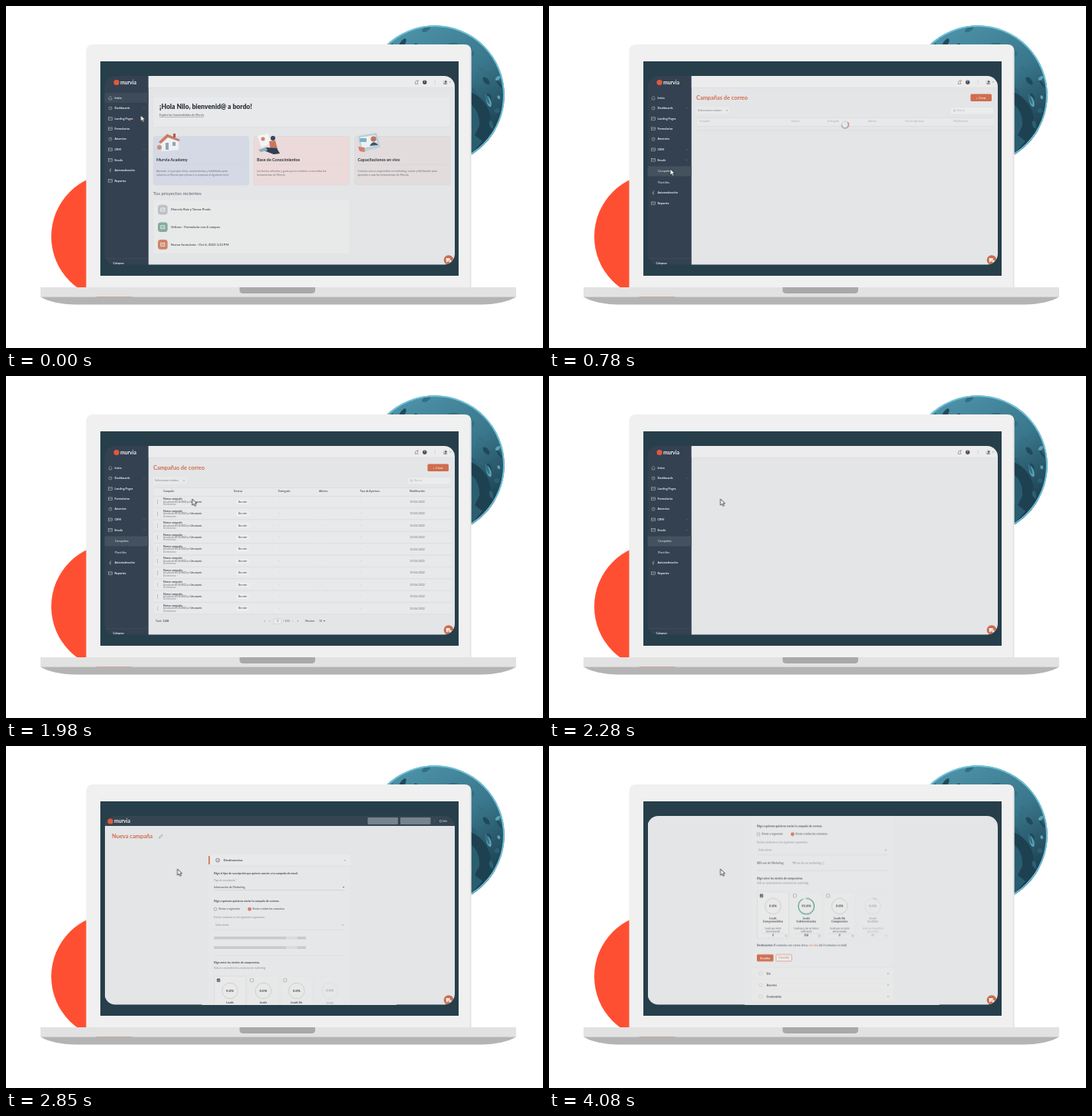
Write an HTML page that moves like this. It is 700 px wide and 445 px high and loops after 4.17 s.

```html
<!DOCTYPE html>
<html lang="es">
<head>
<meta charset="utf-8">
<title>Campañas de correo</title>
<style>
  html, body { margin: 0; width: 100%; height: 100%; overflow: hidden; background: #fff; }
  svg { display: block; width: 100vw; height: 100vh; font-family: Lato, "Open Sans", sans-serif; }
</style>
</head>
<body>
<script>
const LOOP = 4170;
const INK = '#454b52', GREY = '#8b9095', LINE = '#d3d5d7', ORANGE = '#cf6d4e', NAVY = '#344150', PAGE = '#e4e5e7';

// ---- Markup helpers; text y is the middle of the line ----
const attrs = o => Object.entries(o).map(([k, v]) => `${k}="${v}"`).join(' ');
const rect = (x, y, w, h, fill, more = {}) =>
  `<rect ${attrs({ x, y, width: w, height: h, fill, ...more })}/>`;
const circle = (cx, cy, r, fill, more = {}) => `<circle ${attrs({ cx, cy, r, fill, ...more })}/>`;
const path = (d, fill = 'none', stroke = 'none', width = 0.6, more = {}) =>
  `<path ${attrs({ d, fill, stroke, 'stroke-width': width, ...more })}/>`;
const text = (x, y, size, str, fill = INK, weight = 400, more = {}) =>
  `<text ${attrs({ x, y: y + size * 0.34, 'font-size': size, fill, 'font-weight': weight, ...more })}>${str}</text>`;
const mid = (x, y, size, str, fill, weight) => text(x, y, size, str, fill, weight, { 'text-anchor': 'middle' });
const hline = (x1, x2, y, color = LINE, width = 0.5) => path(`M${x1} ${y}H${x2}`, 'none', color, width);
const caret = (x, y, color = GREY) => path(`M${x - 1.2} ${y - 0.6}h2.4l-1.2 1.4z`, color);
const group = (id, ...parts) => `<g id="${id}">${parts.join('')}</g>`;
const outline = (color, width = 0.5) => ({ stroke: color, 'stroke-width': width });

// ---- Scenery ----
function planet() {
  let seed = 7;
  const rnd = () => (seed = seed * 16807 % 2147483647) / 2147483647;
  let marks = '';
  for (let i = 0; i < 34; i++) {
    const a = -2.3 + rnd() * 3.2, d = 50 + rnd() * 38;
    const x = 559 + Math.cos(a) * d, y = 116 + Math.sin(a) * d;
    const tone = ['#2b6074', '#204a5b', '#5da3b7', '#356f84'][i % 4];
    marks += `<ellipse ${attrs({ cx: x, cy: y, rx: 2 + rnd() * 8, ry: 1 + rnd() * 3, fill: tone,
      transform: `rotate(${a * 57 + 65} ${x} ${y})` })}/>`;
  }
  return `<g clip-path="url(#ball)">${circle(559, 116, 91, 'url(#sea)')}${marks}
    ${path('M606 112Q628 122 632 146Q625 158 640 162L607 205Z', '#1d4151')}
    ${path('M606 128q12 10 11 28l-6 12l10 8l-14 16z', '#2a5d70')}
    ${circle(559, 116, 90, 'none', outline('#6fc3d9', 2))}</g>`;
}

const laptop = [
  circle(141, 300, 82, '#ff4f32'),
  planet(),
  path('M104.500 367V59Q104.500 50 113.500 50H597.500Q606.500 50 606.500 59V367Z', '#f0f0f0'),
  path('M605.500 58V366', 'none', '#e2e2e2', 1.5),
  rect(123, 72, 467, 279, '#263f4b'),
  rect(45, 366, 620, 12.500, '#e2e2e2'),
  path('M45 378.500H665Q649 388 619 388.500H91Q61 388 45 378.500Z', '#b4b4b4'),
  path('M304.500 366H403V370Q403 374 398 374H309.500Q304.500 374 304.500 370Z', '#a9a9a9')
].join('');

const brand = (x, y) => circle(x, y, 3.6, '#e0593c') + text(x + 5, y, 6.8, 'murvia', '#f4f4f4', 700);

// ---- Application shell ----
const icon = (y, kind) => [
  path(`M133.600 ${y}l2.400-2.200l2.400 2.200M134.300 ${y}v2.200h3.400v-2.200`, 'none', '#aeb6be', 0.6),
  circle(136, y, 2, 'none', outline('#aeb6be', 0.6)) + path(`M136 ${y}l1.200-1`, 'none', '#aeb6be'),
  rect(133.7, y - 1.8, 4.6, 3.6, 'none', outline('#aeb6be', 0.6)) + hline(133.7, 138.3, y - 0.4, '#aeb6be'),
  path(`M137 ${y - 2.500}l-2.200 2.800h1.800l-.8 2.400`, 'none', '#aeb6be', 0.7)
][kind];
const item = (y, label, kind, folds) => icon(y, kind) + text(141.5, y, 3.75, label, '#f0f2f4', 700) +
  (folds ? path(`M179 ${y - 0.5}l1 1l1-1`, 'none', '#7f8993', 0.5) : '');

const sidebar = [
  rect(128, 90, 57.5, 248, NAVY),
  brand(144, 99.5),
  group('homeActive', rect(128, 113, 57.5, 13, '#3e4b59')),
  item(119.7, 'Inicio', 0), item(133, 'Dashboards', 1, true), item(146.6, 'Landing Pages', 2),
  item(159.8, 'Formularios', 2), item(173.2, 'Anuncios', 1), item(186.8, 'CRM', 2, true),
  item(200.3, 'Emails', 2, true),
  group('submenu',
    group('subHover', rect(128, 208.5, 57.5, 13, '#44515e')),
    text(142, 214.8, 3.9, 'Campañas', '#dfe3e7'), text(142, 229.2, 3.9, 'Plantillas', '#dfe3e7')),
  group('below', item(213.6, 'Automatización', 3), item(227.4, 'Reportes', 2)),
  hline(128, 185.5, 328.8, '#4a5663'),
  text(135, 334.6, 3.6, '‹', '#dfe3e7'), text(139.5, 335, 3.7, 'Colapsar', '#eef0f2', 700)
].join('');

const topbar = rect(185.5, 90, 400, 16, '#ececed') + hline(185.5, 585, 106.3, '#d5d7d9') +
  path('M533 101.300h4l-.6-1v-2q-1.400-2.400-2.800 0v2z', 'none', '#6f757b', 0.6) + circle(537, 97, 0.8, '#d9583b') +
  circle(545.8, 99.2, 2.7, '#4b5158') + mid(545.8, 99, 3, '?', '#fff', 700) +
  path('M559.200 96.500v5.500', 'none', '#c3c6c9', 0.6) +
  circle(572.5, 99.5, 3, '#cfd3d7') + circle(573.2, 98.4, 1.2, '#4b5158') + path('M570 101.500q2.500-2.500 5.500 0z', '#687078') +
  caret(579, 99);

// ---- Home ----
const card = (x, fill, title, a, b) => rect(x, 169.5, 124.5, 63.5, fill, { rx: 3, ...outline('#d0d1d6', 0.4) }) +
  text(x + 4, 200.6, 5.4, title, '#3c4249', 800) + hline(x + 4, x + 120, 206.3, '#cfd0d6', 0.4) +
  text(x + 4, 214.8, 3.5, a, '#72777d') + text(x + 4, 219.6, 3.5, b, '#72777d');
const project = (y, color, label) => rect(198, y - 6.2, 12.6, 12.6, color, { rx: 3.5 }) +
  rect(201.8, y - 2, 5, 4, 'none', outline('#fff', 0.7)) + hline(202.6, 206, y, '#fff') +
  text(215, y, 4.2, label, '#555a60', 700);

const home = group('home',
  rect(192, 118, 387, 39.500, '#e8e9ea', { rx: 2, ...outline('#dcdddf', 0.4) }),
  text(200, 131.6, 8.5, '¡Hola Nilo, bienvenid@ a bordo!', '#30363c', 900),
  text(200, 141.8, 3.5, 'Explore las funcionalidades de Murvia', '#4f555b', 400, { 'text-decoration': 'underline' }),
  hline(192, 579, 158.5, '#dcdddf'),
  card(192, '#d5d9e5', 'Murvia Academy', 'Aprende, a tu propio ritmo, conocimientos y habilidades para',
    'volverte un Murvia pro y llevar a tu empresa al siguiente nivel.'),
  card(323, '#ecdada', 'Base de Conocimientos', 'Lee breves artículos y guías que te enseñan a usar todas las', 'herramientas de Murvia.'),
  card(454.500, '#e2dcdc', 'Capacitaciones en vivo', 'Conecta con un especialista en marketing, ventas y fidelización para',
    'aprender a usar las herramientas de Murvia.'),
  // house
  path('M197 184l8-5l22 3l-3 7h-24z', '#d6dde3'), path('M201 176l10-9l14 7v13l-22 2z', '#eef1f3'),
  path('M199 177l11-10.500l17 7.500l-2 2l-14-5l-9 8z', '#cb7b65'), rect(208, 178, 4, 9, '#90a6b5'),
  rect(217, 177, 4, 5, '#90a6b5'), circle(200, 184, 3, '#c98f79'), rect(218, 166, 3, 5, '#a85d4d'),
  // reader
  path('M328 169l14-3l4 13l-13 5z', '#f3f4f5'), circle(335, 173, 2.500, '#d68069'),
  circle(348, 172, 3, '#36465a'), path('M343 176l8-1l3 11l-9 2z', '#ca765d'),
  path('M338 184l15 1l4 7l-8 1l-13-5z', '#2d4054'), path('M329 187l10-3l2 4l-9 2z', '#8ab1bd'),
  // video call
  path('M459 169l24-4l5 19l-25 6z', '#bdcfda'), path('M461 171l20-3l3 13l-20 4z', '#edf1f3'),
  circle(479, 173, 3.600, '#bd745e'), path('M474 182q5-9 11-1z', '#39576d'),
  rect(461, 172, 9, 5, '#7fb1c6', { rx: 1 }), path('M459 183l8 1l1 6l-7-1z', '#d68069'),
  text(192, 244, 6.1, 'Tus proyectos recientes', '#5d6268'),
  rect(192, 252, 256, 70.500, '#e8e9e9', { rx: 2, ...outline('#dedfe1', 0.4) }),
  project(265, '#bcc2c7', 'Marcela Ruiz y Tomas Prado'),
  project(287.700, '#86ab9f', 'Velturo - Formulario con 4 campos'),
  project(310.300, '#cf8466', 'Nuevo formulario - Oct 4, 2022 3:33 PM'));

// ---- Campaign list ----
const columns = ['Campaña', 'Estatus', 'Entregado', 'Abierta', 'Tasa de Apertura', 'Modificación'];
const heads = (xs, fill, weight) => columns.map((c, i) => text(xs[i], 150.2, 3.4, c, fill, weight)).join('');
const rowYs = Array.from({ length: 10 }, (_, i) => 163.8 + i * 15.4);
const row = y => rect(193, y - 6.8, 387, 14, '#e8e9ea') + hline(193, 580, y + 7.4, '#d6d8da') +
  [-2, 0, 2].map(d => circle(197.5, y + d, 0.45, INK)).join('') +
  text(205, y - 3.6, 3.5, 'Nueva campaña', INK, 700) +
  text(205, y, 2.75, 'Actualizado <tspan font-weight="700">05/10/2022</tspan> por', '#73787e') +
  text(205, y + 3.5, 2.8, 'Destinatarios: -', '#85898e') +
  rect(300.5, y - 3, 16, 6, '#f0f0f0', { rx: 1 }) + mid(308.5, y, 3, 'Borrador', INK) +
  [356, 409, 462].map(x => text(x, y, 3.5, '-', GREY)).join('') +
  text(526.5, y, 3.5, '10/06/2022', '#6d7278');

const list = group('list',
  text(192, 119, 7.4, 'Campañas de correo', ORANGE, 700),
  rect(549.500, 114.500, 27.500, 9.500, ORANGE, { rx: 1.500 }), mid(563.300, 119.200, 4, '+ Crear', '#fff'),
  rect(192, 131, 43, 10, '#e8e9ea', { rx: 1 }), text(194, 136, 3.7, 'Seleccionar estatus', '#7f848a'), caret(232, 136),
  rect(523, 131.500, 57, 9.500, '#ebecec', { rx: 1, ...outline('#dadcde') }),
  circle(528.500, 136, 1.300, 'none', outline(GREY, 0.4)), text(532, 136.300, 3.400, 'Buscar', '#b4b7ba'),
  rect(193, 145.500, 387, 11, '#e8e9ea'), hline(193, 580, 145.500), hline(193, 580, 156.500),
  group('loading', heads([196, 316, 363, 416, 464, 527], '#aeb1b4', 400), hline(193, 580, 162),
    `<g transform="translate(386 154.500)">${circle(0, 0, 4.500, '#e8e9ea', outline('#c9ccce', 1))}
      ${group('spinner', path('M0-4.500A4.500 4.500 0 0 1 4.500 0', 'none', '#d85e4b', 1.100),
      path('M4.500 0A4.500 4.500 0 0 1-3.200 3.200', 'none', '#7fb29f', 1.100))}</g>`),
  group('rows', heads([205, 297, 355, 408, 461.500, 526], '#585d63', 700), rowYs.map(row).join(''),
    group('authors', rowYs.map(y => text(240.5, y, 2.75, 'Una usuaria', INK, 700)).join('')),
    text(195, 319, 3.500, 'Total: <tspan font-weight="700">1148</tspan>'),
    text(336, 319, 4, '«'), text(343, 319, 4, '‹'), rect(349, 316, 10, 6.500, '#ececec', outline('#c6c8ca')),
    mid(354, 319.200, 3.600, '1'), text(361, 319, 3.600, '/ 115'), text(373, 319, 4, '›'), text(379.500, 319, 4, '»'),
    text(390, 319, 3.500, 'Mostrar'), text(408, 319, 3.500, '10'), caret(415, 318.700, INK)));

const shell = group('shell', rect(185.5, 90, 400, 248, PAGE), topbar, home, list, sidebar);

// ---- Campaign editor ----
const step = (y, label) => rect(264, y - 7.4, 184.5, 14.8, '#e8e8e8') + hline(264, 448.5, y + 7.5) +
  circle(276, y, 2.3, 'none', outline('#c2c5c8', 0.5)) + text(283.5, y, 4.2, label, INK, 700) + caret(442, y);
const steps = y => ['De', 'Asunto', 'Contenido'].map((s, i) => step(y + i * 15, s)).join('');
const bars = (id, ...list) => `<clipPath id="${id}Clip">${list.map(([y, w]) => rect(271, y, w, 3.6, '#000')).join('')}</clipPath>
  <g id="${id}" clip-path="url(#${id}Clip)">${rect(271, list[0][0], 130, 20, '#cacaca')}
  ${rect(271, list[0][0], 15, 20, '#dadada', { class: 'shine' })}</g>`;
const checkbox = (x, y, on) => rect(x - 2, y - 2, 4, 4, on ? '#4c5a66' : '#eee', { rx: 0.5, ...outline('#7b8187', 0.5) }) +
  (on ? path(`M${x - 1} ${y}l.8.9l1.400-1.700`, 'none', '#fff', 0.6) : '');

function level(i, percent, a, b, c, d, count) {
  const x = 292 + i * 43.4, len = 2 * Math.PI * 10.3;
  return `<g opacity="${i === 3 ? 0.42 : 1}">` +
    rect(x - 20.5, 287, 41, 61, i ? '#e7e8e8' : '#e9e9e9', { rx: 1, ...outline(i ? '#dfe0e1' : '#cdd0d2', 0.4) }) +
    (i < 3 ? checkbox(x - 15, 292.3, i === 0) : '') +
    circle(x, 306, 10.3, 'none', outline('#c6c9cb', 0.8)) +
    `<g class="pending">${mid(x, 306, 4.4, '0.0%', INK, 800)}</g><g class="loaded">` +
    circle(x, 306, 10.3, 'none', { ...outline('#5f9f8c', 1.1), 'stroke-dasharray': `${len * percent / 100} ${len}`,
      transform: `rotate(-90 ${x} 306)` }) + mid(x, 306, 4.4, percent.toFixed(1) + '%', INK, 800) + '</g>' +
    mid(x, 321.4, 3.7, a, INK, 700) + mid(x, 326.2, 3.7, b, INK, 700) +
    mid(x, 335.4, 3, c, '#666b71') + mid(x, 339.4, 3, d, '#666b71') + hline(x - 15, x + 15, 341.6) +
    `<g class="loaded">${mid(x, 344.3, 3.4, count, INK, 700)}</g>` +
    circle(x + 17, 344.3, 1.3, 'none', outline(GREY, 0.4)) + '</g>';
}

const bold = (y, str) => text(271, y, 3.55, str, INK, 700);
const editor = group('editor', rect(128, 90, 458, 248, '#e3e5e7'), group('scroll',
  rect(128, 90, 458, 14, '#364552'), brand(136, 98),
  rect(471.500, 93, 39.500, 9, '#77838e', { rx: 1 }), rect(514, 93, 39.500, 9, '#77838e', { rx: 1 }),
  path('M558.500 95v5.500', 'none', '#536170'), circle(566.500, 97.800, 1.300, 'none', outline('#e7eaec', 0.5)),
  text(569, 97.800, 3.200, 'Salir', '#eef0f2'),
  text(138, 117, 7.5, 'Nueva campaña', ORANGE, 700),
  path('M199.500 120l.6-1.800l3-3l1.200 1.200l-3 3z', 'none', '#92979c', 0.7),
  group('folded', rect(264, 141.500, 184.500, 38.500, '#e7e8e8'), bars('shortBars', [158.2, 98], [167, 53.5]), hline(264, 448.500, 180), steps(187.500)),
  group('unfolded', rect(264, 141.500, 184.500, 300, '#e6e7e8'),
    bold(166, 'Elige el tipo de suscripción que quieres asociar a tu campaña de email.'),
    text(271, 174.500, 3.300, 'Tipo de suscripción *', GREY), text(271, 183.600, 3.600, 'Información de Marketing'),
    hline(271, 442, 187.500, '#c2c5c7'), caret(440, 183.500, INK),
    bold(202, 'Elige a quienes quisieras enviar la campaña de correos.'),
    circle(273, 212.200, 2, 'none', outline('#777d83')), text(277.500, 212.200, 3.400, 'Enviar a segmento'),
    circle(317.500, 212.200, 2, '#d98468', outline(ORANGE, 0.7)), text(321.500, 212.200, 3.400, 'Enviar a todos los contactos'),
    text(271, 222.800, 3.300, 'Excluir contactos en los siguientes segmentos:', GREY),
    text(273, 233.300, 3.500, 'Seleccionar', GREY), caret(439, 233), hline(271, 442, 239, '#cfd1d3'),
    `<g class="pending">${bars('longBars', [248, 120], [260.4, 120])}</g>`,
    `<g class="loaded">${text(271, 250, 3.600, '<tspan font-weight="700">331</tspan> son de Marketing')}
      ${text(317.500, 250, 3.600, '<tspan font-weight="700">99</tspan> son de no marketing ⓘ', GREY)}</g>`,
    group('lower', hline(271, 442, 259.700, '#cfd1d3'), bold(269.400, 'Elige entre los niveles de compromiso.'),
      text(271, 276, 3.300, 'Sólo se contendrán los contactos de marketing', GREY),
      level(0, 0, 'Leads', 'Comprometidos', 'Leads que están', 'interactuando', 0),
      level(1, 91.8, 'Leads', 'Indeterminados', 'Leads que aún no tienen', 'calificación', 304),
      level(2, 0, 'Leads Sin', 'Compromiso', 'Leads que no están', 'interactuando', 0),
      level(3, 8.2, 'Leads', 'Inválidos', 'Leads no disponibles', 'para envíos', 27),
      text(271, 357.200, 3.450, `<tspan font-weight="700">Destinatarios: 0</tspan> contactos con correo único, <tspan fill="${ORANGE}">ver Lista</tspan> (de 0 contactos en total)`),
      rect(271, 368.700, 21.500, 9, ORANGE, { rx: 1 }), mid(281.700, 373.200, 3.900, 'Guardar', '#fff', 700),
      rect(296, 368.900, 20.500, 8.600, '#ececec', { rx: 1, ...outline(ORANGE) }), mid(306.200, 373.200, 3.600, 'Cancelar', ORANGE),
      hline(264, 448.500, 386), steps(393.500))),
  rect(264, 141.500, 184.500, 14.500, '#e9e9e9'), hline(264, 448.500, 156), rect(264, 143, 1.600, 11, ORANGE),
  circle(276, 148.700, 2.400, 'none', outline('#59636b', 0.7)), path('M274.900 148.700l.9.9l1.600-1.800', 'none', '#59636b', 0.6),
  text(283.500, 148.500, 4.200, 'Destinatarios', INK, 700), caret(442, 149)));

const chat = circle(577, 330.500, 6.300, '#c96c4f') + path('M573.500 328h5q1.500 3-1 4.500h-2l-1.500 1.500z', '#f3e9e5') +
  circle(579, 332, 1.900, '#f3e9e5', outline('#c96c4f'));
const cursor = group('cursor', path('M0 0V8.200L2 6.400L3.400 9.300L4.900 8.600L3.500 5.800H6Z', '#f7f7f7', '#2b3036', 0.8));

document.body.innerHTML = `<svg viewBox="0 0 700 445" preserveAspectRatio="none"><defs>
  <clipPath id="screen"><rect x="128.500" y="91" width="456.500" height="245.500" rx="14"/></clipPath>
  <clipPath id="ball"><circle cx="559" cy="116" r="91"/></clipPath>
  <linearGradient id="sea" x1="0.3" y1="0" x2="0.9" y2="1">
    <stop offset="0" stop-color="#4d93a9"/><stop offset=".45" stop-color="#39768b"/><stop offset=".8" stop-color="#1f4556"/>
  </linearGradient></defs>${laptop}<g clip-path="url(#screen)">${shell}${editor}${chat}</g>${cursor}</svg>`;

// ---- Motion: steps are [ms, value, easing]; without easing the value holds ----
const HOLD = 'steps(1, end)';
function play(selector, prop, steps) {
  const frames = steps.map(([ms, value, easing = HOLD]) => ({ offset: ms / LOOP, [prop]: value, easing }));
  frames.push({ offset: 1, [prop]: steps[steps.length - 1][1] });
  for (const node of document.querySelectorAll(selector)) node.animate(frames, { duration: LOOP, iterations: Infinity });
}
const show = (selector, from, to = LOOP) => play(selector, 'opacity',
  [...(from ? [[0, 0]] : []), [from, 1], ...(to < LOOP ? [[to, 0]] : [])]);
const at = (x, y) => `translate(${x}px, ${y}px)`;

show('#home', 0, 600);
show('#homeActive', 0, 600);
show('#submenu', 330);
show('#subHover', 480);
show('#list', 600, 2160);
show('#loading', 600, 900);
show('#rows', 900);
show('#authors', 1080);
show('#shell', 0, 2490);
show('#editor', 2490);
show('#folded', 2490, 2640);
show('#unfolded', 2640);
show('.pending', 0, 3030);
show('.loaded', 3030);

play('#below', 'transform', [[0, at(0, 0)], [300, at(0, 0), 'ease-out'], [390, at(0, 29.3)]]);
play('#spinner', 'transform', [[0, 'rotate(0deg)', 'linear'], [LOOP * 0.999, 'rotate(2160deg)']]);
play('.shine', 'transform', [[0, at(-16, 0)], [2490, at(0, 0), 'linear'], [2970, at(125, 0)]]);
play('#lower', 'transform', [[0, at(0, 12.5)], [3030, at(0, 0)]]);
play('#scroll', 'transform', [[0, at(0, 0)], [3510, at(0, -20)], [3540, at(0, -40)],
  [3720, at(0, -40), 'ease-in-out'], [4080, at(0, -97.5)]]);
play('#cursor', 'transform', [[0, at(175.5, 142)], [60, at(175.5, 142), 'ease-in-out'], [300, at(152, 197)],
  [360, at(152, 197), 'ease-in-out'], [540, at(158, 212)], [1590, at(158, 212), 'ease-in-out'],
  [1890, at(258, 161), 'ease-in-out'], [1980, at(243, 160), 'ease-out'], [2100, at(223.5, 160)]]);
</script>
</body>
</html>
```
